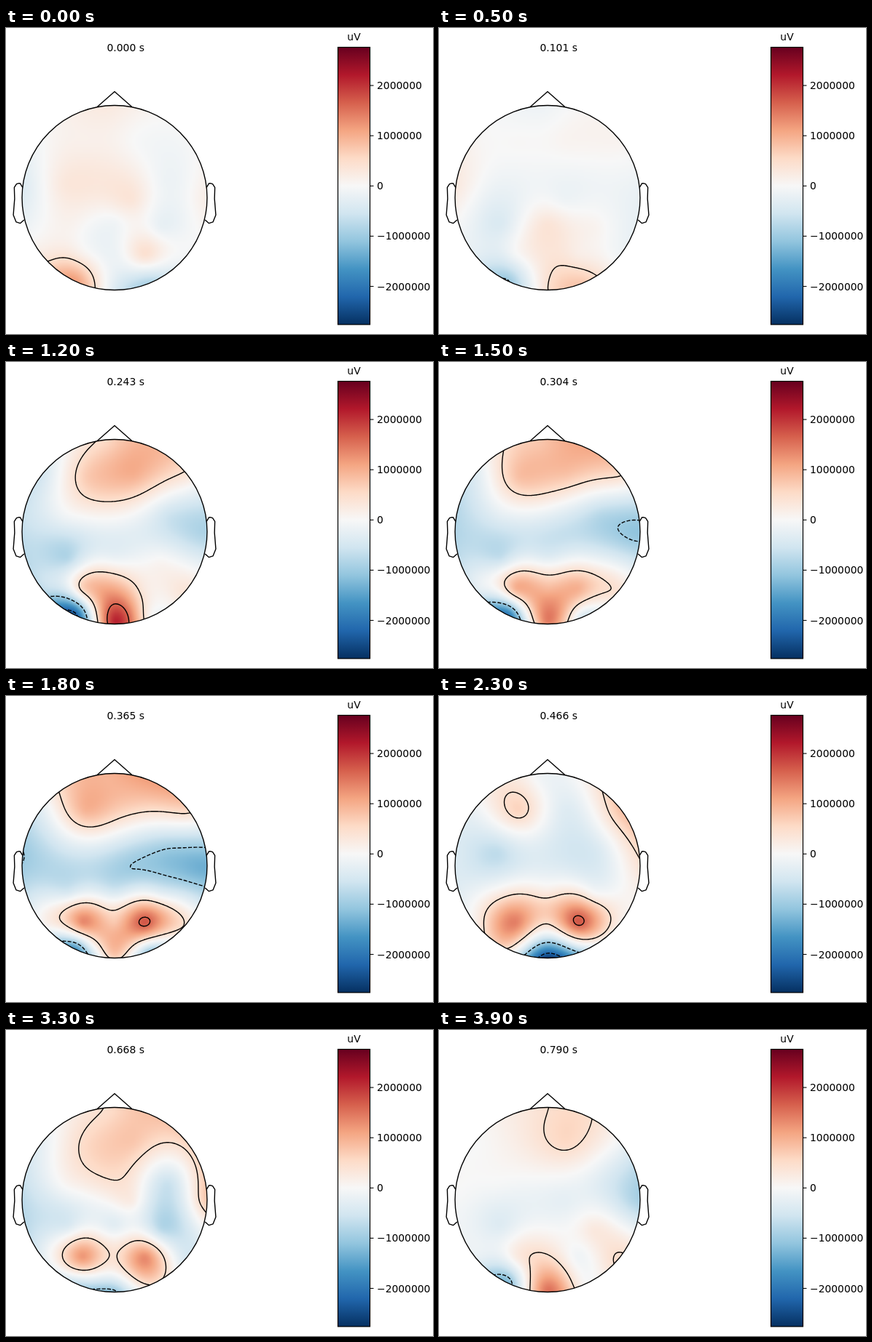
Write an HTML page with a canvas that moves like this. It is 586 px wide and 421 px high and loops after 4000 ms.

```html
<!DOCTYPE html>
<html>
<head>
<meta charset="utf-8">
<style>
html, body { margin: 0; width: 586px; height: 421px; overflow: hidden; background: #fff; }
canvas, svg { position: absolute; left: 0; top: 0; }
text { font: 13.89px "DejaVu Sans", sans-serif; white-space: pre; }
.line { fill: none; stroke: #000; stroke-width: 1.39; stroke-linejoin: round; }
.thin { fill: none; stroke: #000; stroke-width: 1.1; }
</style>
</head>
<body>
<canvas id="map" width="586" height="421"></canvas>
<svg width="586" height="421">
  <defs><linearGradient id="scale" x1="0" y1="1" x2="0" y2="0"></linearGradient></defs>
  <circle class="line" cx="149" cy="233.5" r="127"/>
  <path class="line" d="M125.5 108.2L149 87.5L172.5 108.2"/>
  <g id="ears"></g>
  <rect x="455.5" y="26.5" width="44" height="381.5" fill="url(#scale)" stroke="#000" stroke-width="1.2"/>
  <g id="ticks"></g>
  <text x="477.5" y="17" text-anchor="middle">uV</text>
  <text id="clock" x="138.5" y="31.5"></text>
</svg>
<script>
const CX = 149, CY = 233.5, R = 127, LIMIT = 2.76;
const STEP = 2, N = 129, LEFT = 21, TOP = 105.5;
const FRAMES = 40, FRAME_MS = 100, SPAN = 0.79;
const LEVELS = [-2.2, -1, 0.45, 1.6];
const $ = id => document.getElementById(id);

// Blue to red scale
const stops = ['053061', '2166ac', '4393c3', '92c5de', 'd1e5f0', 'f7f7f7',
  'fddbc7', 'f4a582', 'd6604d', 'b2182b', '67001f'];
const rgb = stops.map(s => [0, 2, 4].map(i => parseInt(s.slice(i, i + 2), 16)));

// Sensor positions in pixels
const sensors = [
  [95, 347], [149, 358], [197, 352],
  [105, 312], [149, 312], [191, 312], [55, 318], [245, 318],
  [85, 270], [149, 268], [213, 274],
  [25, 220], [80, 215], [172, 237], [222, 210], [270, 235],
  [52, 155], [110, 158], [175, 155], [245, 160], [140, 112]
].map(([x, y]) => [(x - CX) / R, (y - CY) / R]);

// Sensor readings in millions of uV at the key steps
const keySteps = [0, 5, 12, 18, 23, 33, 39];
const readings = [
  [1.15, -.35, -.9, .15, -.15, .42, .38, -.1, .12, -.1, -.2, -.35, .3, .35, -.15, .15, 0, .15, 0, -.05, .25],
  [-1, .44, .75, -.05, .35, .2, -.35, -.05, -.4, .35, .1, .25, -.15, -.12, -.1, -.2, .05, .02, .08, .08, -.12],
  [-2.3, 2.1, .1, .6, 1.05, .25, -.8, .35, -.8, -.2, .05, -.6, -.15, -.3, -.55, -.85, -.45, .7, 1, .3, .6],
  [-1.6, .7, -1.05, 1.3, .75, 1.72, 0, .4, -.45, -.5, -.15, -1, -.55, -1, -1, -1.35, -.2, .95, .6, .5, .95],
  [.45, -2.5, -.85, 1.4, .5, 1.7, .25, .15, .2, .2, .1, -.4, -.7, -.35, -.35, .3, -.1, .6, -.35, .7, -.1],
  [-.6, -1, .4, 1.2, .42, 1.3, -.2, -.4, -.4, -.3, -.75, -.65, 0, .2, -.6, .6, -.2, .55, .75, .5, .5],
  [-1.2, 1.5, .1, .2, .5, -.1, -.3, .5, -.35, -.05, .28, 0, -.05, -.25, -.35, -.85, 0, .2, .55, -.1, .4]
];

// Thin-plate spline through the sensors
const kernel = d2 => d2 > 0 ? d2 * Math.log(d2) : 0;
const basis = (x, y) => [...sensors.map(([a, b]) => kernel((x - a) ** 2 + (y - b) ** 2)), 1, x, y];

function solve(rows, size) {
  for (let c = 0; c < size; c++) {
    let best = c;
    for (let r = c; r < size; r++) if (Math.abs(rows[r][c]) > Math.abs(rows[best][c])) best = r;
    [rows[c], rows[best]] = [rows[best], rows[c]];
    const pivot = rows[c][c];
    rows[c] = rows[c].map(v => v / pivot);
    for (let r = 0; r < size; r++) {
      const k = rows[r][c];
      if (r !== c && k) rows[r] = rows[r].map((v, i) => v - k * rows[c][i]);
    }
  }
  return rows.map(row => row.slice(size));
}

const weights = solve([
  ...sensors.map(([x, y], i) => [...basis(x, y), ...readings.map(r => r[i])]),
  ...[() => 1, p => p[0], p => p[1]].map(f => [...sensors.map(f), 0, 0, 0, ...readings.map(() => 0)])
], sensors.length + 3);

const fields = readings.map(() => new Float32Array(N * N));
for (let i = 0; i < N * N; i++) {
  const x = (LEFT + i % N * STEP - CX) / R, y = (TOP + Math.floor(i / N) * STEP - CY) / R;
  if (x * x + y * y > 1.2) continue;
  const b = basis(x, y);
  fields.forEach((f, k) => { f[i] = b.reduce((sum, v, j) => sum + v * weights[j][k], 0); });
}

function fieldAt(step) {
  let k = 0;
  while (k < keySteps.length - 2 && step >= keySteps[k + 1]) k++;
  const u = (step - keySteps[k]) / (keySteps[k + 1] - keySteps[k]);
  return fields[k].map((v, i) => v + (fields[k + 1][i] - v) * u);
}

const ctx = $('map').getContext('2d');
const tile = document.createElement('canvas');
tile.width = tile.height = N;
const tileCtx = tile.getContext('2d');
const pixels = tileCtx.createImageData(N, N);

function paintField(field) {
  field.forEach((v, i) => {
    const p = Math.min(9.999, Math.max(0, (v / LIMIT + 1) * 5)), s = Math.floor(p);
    for (let c = 0; c < 3; c++) pixels.data[4 * i + c] = rgb[s][c] + (rgb[s + 1][c] - rgb[s][c]) * (p - s);
    pixels.data[4 * i + 3] = 255;
  });
  tileCtx.putImageData(pixels, 0, 0);
  ctx.drawImage(tile, LEFT - STEP / 2, TOP - STEP / 2, N * STEP, N * STEP);
}

// Crossings of one level, linked through the triangles they share
function crossings(field, level) {
  const points = new Map();
  const point = ([a, b]) => {
    const key = a * N * N + b;
    if (!points.has(key)) {
      const u = (level - field[a]) / (field[b] - field[a]);
      const mix = (p, q) => p + (q - p) * u;
      points.set(key, {
        x: LEFT + STEP * mix(a % N, b % N),
        y: TOP + STEP * mix(Math.floor(a / N), Math.floor(b / N)),
        links: []
      });
    }
    return points.get(key);
  };
  for (let i = 0; i < N * (N - 1); i++) {
    if (i % N === N - 1) continue;
    const far = i + N + 1;
    for (const mid of [i + 1, i + N]) {
      const cut = [[i, mid], [mid, far], [i, far]].filter(([a, b]) => field[a] < level !== field[b] < level);
      if (!cut.length) continue;
      const [p, q] = cut.map(point);
      p.links.push(q);
      q.links.push(p);
    }
  }
  return [...points.values()].sort((p, q) => p.links.length - q.links.length);
}

function strokeLevel(field, level) {
  ctx.setLineDash(level < 0 ? [5.1, 2.2] : []);
  ctx.beginPath();
  for (const start of crossings(field, level)) {
    if (start.seen) continue;
    ctx.moveTo(start.x, start.y);
    for (let p = start; p; p = p.links.find(q => !q.seen)) {
      p.seen = true;
      ctx.lineTo(p.x, p.y);
    }
    if (start.links.length === 2) ctx.closePath();
  }
  ctx.stroke();
}

function draw(step) {
  const field = fieldAt(step);
  ctx.clearRect(0, 0, 586, 421);
  ctx.save();
  ctx.beginPath();
  ctx.arc(CX, CY, R, 0, 7);
  ctx.clip();
  paintField(field);
  ctx.lineWidth = 1.39;
  ctx.lineJoin = 'round';
  LEVELS.forEach(level => strokeLevel(field, level));
  ctx.restore();
  $('clock').textContent = (SPAN * step / (FRAMES - 1)).toFixed(3) + ' s';
}

$('scale').innerHTML = stops.map((s, i) => `<stop offset="${i / 10}" stop-color="#${s}"/>`).join('');
const ear = [[.497, .0555], [.51, .0775], [.518, .0783], [.5299, .0746], [.5419, .0555],
  [.54, -.0055], [.547, -.0932], [.532, -.1313], [.51, -.1384], [.489, -.1199]];
$('ears').innerHTML = [-1, 1].map(side =>
  `<polyline class="line" points="${ear.map(([x, y]) => [CX + side * x * 2 * R, CY - y * 2 * R])}"/>`).join('');
$('ticks').innerHTML = [2, 1, 0, -1, -2].map(v => {
  const y = 217.3 - v * 69.1;
  const label = (v < 0 ? '\u2212' : '') + Math.abs(v * 1e6);
  return `<path class="thin" d="M499.5 ${y}h5"/><text x="509" y="${y + 5}">${label}</text>`;
}).join('');

let shown = -1;
function tick() {
  const step = Math.floor(performance.now() / FRAME_MS) % FRAMES;
  if (step !== shown) draw(shown = step);
  requestAnimationFrame(tick);
}
tick();
</script>
</body>
</html>
```
